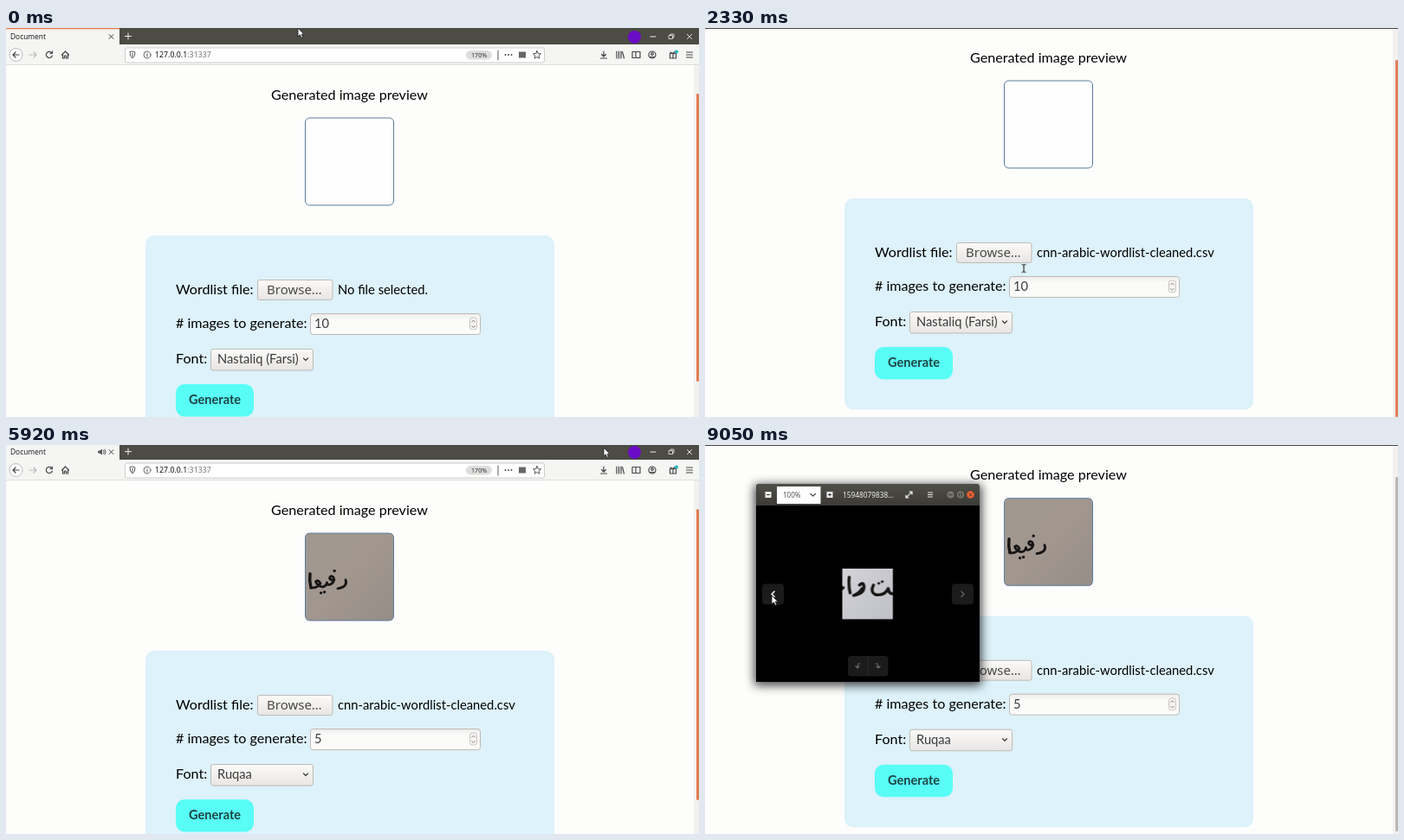
An HTML page for the animation above (9.18 s loop, 800x450 px).

```html
<!DOCTYPE html>
<html lang="en">
<head>
<meta charset="utf-8">
<title>Document</title>
<style>
html, body { margin: 0; width: 100%; height: 100%; overflow: hidden; background: #fdfdfc; }
svg { display: block; width: 100vw; height: 100vh; font-family: "Noto Sans", sans-serif; }
.lato { font: 16.12px Lato, sans-serif; fill: #000; }
.field { font: 14.7px Lato, sans-serif; fill: #3c3c3c; }
.ui { font-size: 8.35px; }
.line { fill: none; stroke: currentColor; stroke-linecap: round; stroke-linejoin: round; }
.ink { fill: none; stroke: #171414; stroke-linecap: round; stroke-linejoin: round; }

[class*="t-"] { animation: 9180ms infinite linear; }
[class*="s-"] { animation: 9180ms infinite step-end; }

.t-page { animation-name: page; animation-timing-function: ease-out; }
@keyframes page {
  0%, 7.5% { transform: none; }
  10.4%, 64% { transform: translateY(-43px); }
  64.6%, 76.2% { transform: none; }
  77.67% { transform: translateY(-41.5px); }
  79%, 100% { transform: translateY(-42.3px); }
}
.t-thumb { animation-name: thumb; animation-timing-function: ease-out; }
@keyframes thumb {
  0%, 7.5% { y: 76px; height: 333px; }
  10.4%, 64% { y: 37px; height: 413px; }
  64.6%, 76.2% { y: 76px; height: 333px; }
  77.67%, 100% { y: 37px; height: 410px; }
}
.s-thumb { animation-name: thumbColor; }
@keyframes thumbColor { 0% { fill: #e37d55; } 76.6% { fill: #b9b7b5; } }
.s-edge { animation-name: edge; }
@keyframes edge { 0% { fill: #0000; } 10% { fill: #45443f; } 64% { fill: #0000; } 77.5% { fill: #ccc; } 78.4% { fill: #45443f; } }

.t-shade { animation-name: shade; }
@keyframes shade { 0%, 16.3% { opacity: 0; } 18%, 22.8% { opacity: 1; } 24%, 100% { opacity: 0; } }
.t-dialog { animation-name: dialog; transform-origin: 415px 245px; animation-timing-function: ease-out; }
@keyframes dialog {
  0%, 16.3% { opacity: 0; transform: scale(.9); }
  18.2%, 22.7% { opacity: 1; transform: none; }
  23.9%, 100% { opacity: 0; transform: scale(.9); }
}
.t-viewer { animation-name: viewer; transform-origin: 188px 160px; animation-timing-function: ease-out; }
@keyframes viewer {
  0%, 76.4% { opacity: 0; transform: translateY(6px) scale(.9); }
  77.6% { opacity: 1; transform: translateY(2px) scale(.985); }
  78.6%, 100% { opacity: 1; transform: none; }
}
.s-focus { animation-name: focus; }
@keyframes focus { 0% { opacity: .5; } 78.8% { opacity: 1; } }
.s-close { animation-name: closeColor; }
@keyframes closeColor { 0% { fill: #77756e; } 78.8% { fill: #ec6237; } }
.t-controls { animation-name: controls; }
@keyframes controls { 0%, 83.5% { opacity: 0; } 86%, 100% { opacity: 1; } }

.s-empty { animation-name: empty; }
@keyframes empty { 0% { visibility: visible; } 23.4% { visibility: hidden; } }
.s-chosen { animation-name: chosen; }
@keyframes chosen { 0% { visibility: hidden; } 23.4% { visibility: visible; } }
.s-ten { animation-name: ten; }
@keyframes ten { 0% { visibility: visible; } 33.8% { visibility: hidden; } }
.s-five { animation-name: five; }
@keyframes five { 0% { visibility: hidden; } 33.8% { visibility: visible; } }
.s-font1 { animation-name: font1; }
@keyframes font1 { 0% { visibility: visible; } 46.8% { visibility: hidden; } }
.s-font2 { animation-name: font2; }
@keyframes font2 { 0% { visibility: hidden; } 46.8% { visibility: visible; } }
.s-result { animation-name: result; }
@keyframes result { 0% { visibility: hidden; } 54% { visibility: visible; } }
.s-download { animation-name: download; }
@keyframes download { 0% { opacity: 0; } 67.6% { opacity: 1; } 75.5% { opacity: 0; } }
.s-last { animation-name: last; }
@keyframes last { 0% { opacity: 1; } 92.6% { opacity: 0; } }
.s-previous { animation-name: previous; }
@keyframes previous { 0% { opacity: 0; } 92.6% { opacity: 1; } }

.t-pointer { animation-name: pointer; animation-timing-function: ease-in-out; }
@keyframes pointer {
  0%, 7.08% { transform: translate(337px, 0); }
  13.6%, 23.9% { transform: translate(339px, 255px); }
  25.3% { transform: translate(368px, 278px); }
  28%, 34.9% { transform: translate(378px, 300px); }
  40.3%, 42% { transform: translate(322px, 341px); }
  46.8%, 48% { transform: translate(290px, 357px); }
  53.4%, 57% { transform: translate(251px, 388px); }
  63.8% { transform: translate(690px, 0); }
  67%, 68.5% { transform: translate(690px, 31px); }
  72%, 75.2% { transform: translate(559px, 127px); }
  77%, 80.6% { transform: translate(538px, 127px); }
  86.1%, 100% { transform: translate(77px, 174px); }
}
.s-arrow { animation-name: arrow; }
@keyframes arrow { 0% { opacity: 1; } 24.4% { opacity: 0; } 36.5% { opacity: 1; } 51% { opacity: 0; } 58% { opacity: 1; } }
.s-beam { animation-name: beam; }
@keyframes beam { 0% { opacity: 0; } 24.4% { opacity: 1; } 36.5% { opacity: 0; } }
.s-hand { animation-name: hand; }
@keyframes hand { 0% { opacity: 0; } 51% { opacity: 1; } 58% { opacity: 0; } }
</style>
</head>
<body>
<svg viewBox="0 0 800 450" preserveAspectRatio="none">
  <defs>
    <linearGradient id="button" x2="0" y2="1"><stop stop-color="#fbfaf9"/><stop offset="1" stop-color="#e8e6e4"/></linearGradient>
    <linearGradient id="input" x2="0" y2="1"><stop stop-color="#ececeb"/><stop offset=".3" stop-color="#fbfbfa"/></linearGradient>
    <linearGradient id="bar" x2="0" y2="1"><stop stop-color="#504f48"/><stop offset="1" stop-color="#3b3a36"/></linearGradient>
    <linearGradient id="paper" x2="1" y2="1"><stop stop-color="#a0978e"/><stop offset=".5" stop-color="#a1978f"/><stop offset="1" stop-color="#968d86"/></linearGradient>
    <linearGradient id="pale" x2="1" y2="1"><stop stop-color="#d3d3d8"/><stop offset="1" stop-color="#bfc0c8"/></linearGradient>
    <filter id="shadow" x="-20%" y="-20%" width="140%" height="140%"><feGaussianBlur stdDeviation="6"/></filter>
    <g id="word">
      <rect width="101" height="101" rx="4" fill="url(#paper)"/>
      <g class="ink" stroke-width="2.8">
        <path stroke-width="3.4" d="M5 47Q4 55 6 63"/>
        <path d="M6 63Q13 64 17 58Q14 53 11.500 56Q14 62 20 62Q24 61 24.500 57Q25 61 29 59Q34 56 32 51Q28.500 48 27.500 52Q29 55 33 54"/>
        <path d="M46 54Q49 62 37 64"/>
        <path stroke-width="3.200" d="M33 43.500h.3M17.500 69h.2M21.500 68h.2"/>
      </g>
    </g>
    <path id="folder" d="M-4-3h3l1 1h4v1h-7l-1 3zM-2.6 0h7.2l-1 3.5h-7.2z" fill="#eee"/>
  </defs>

  <rect width="800" height="450" fill="#fdfdfc"/>
  <rect x="794" width="6" height="450" fill="#f2f1f0"/>

  <g class="t-page">
    <g class="lato">
      <text x="306" y="82.5">Generated image preview</text>
      <rect x="161" y="240" width="472" height="244.500" rx="10" fill="#ddf2fa"/>
      <text x="196" y="308">Wordlist file:</text>
      <text x="196" y="347"># images to generate:</text>
      <text x="196" y="388">Font:</text>
    </g>
    <rect x="346" y="104" width="101" height="101" rx="5" fill="#fefefe"/>
    <use class="s-result" href="#word" x="346" y="104"/>
    <rect x="345.500" y="104" width="102" height="101" rx="5" fill="none" stroke="#5b7b9d"/>

    <g stroke="#bfb9b3">
      <rect x="290.500" y="291.500" width="86.500" height="23" rx="2.500" fill="url(#button)"/>
      <rect x="351.500" y="330.500" width="196" height="24" rx="3" fill="url(#input)"/>
      <rect x="236.500" y="371.500" width="118" height="24.500" rx="2.500" fill="url(#button)"/>
      <rect x="535.500" y="335" width="8" height="14" rx="3" fill="#f6f5f4" stroke-width=".8"/>
    </g>
    <path class="line" color="#888" d="M537.700 340l1.800-2 1.800 2M537.700 344.500l1.800 2 1.800-2"/>
    <path class="line" color="#444" stroke-width="1.300" d="M343.500 382l2.500 2.500 2.500-2.500"/>
    <text x="301" y="308" font-size="15" fill="#4a4a48">Browse…</text>
    <g font-family="Lato, sans-serif" font-size="14.76" fill="#000">
      <text class="s-empty" x="383" y="308">No file selected.</text>
      <text class="s-chosen" x="383" y="308">cnn-arabic-wordlist-cleaned.csv</text>
    </g>
    <g class="field">
      <text class="s-ten" x="356" y="347">10</text>
      <text class="s-five" x="356" y="347">5</text>
      <text class="s-font1" x="244" y="388">Nastaliq (Farsi)</text>
      <text class="s-font2" x="244" y="388">Ruqaa</text>
    </g>
    <rect x="196" y="412" width="90" height="37.500" rx="10" fill="#58fdf6"/>
    <text x="211" y="435" font-family="Lato, sans-serif" font-weight="700" font-size="14.6" fill="#1d4543">Generate</text>

    <g id="toolbar" class="ui">
      <rect width="800" height="19.500" fill="#4c4b44"/>
      <rect width="131" height="20" fill="#f5f5f4"/>
      <rect width="131" height="1.300" fill="#e37d55"/>
      <rect y="19" width="800" height="24" fill="#f5f5f4"/>
      <rect y="42.400" width="800" height=".6" fill="#ccc"/>
      <text x="5" y="13" fill="#222">Document</text>
      <g class="s-result line" color="#555" stroke-width="1">
        <path fill="#555" d="M107 9h1.500l2-2v6l-2-2H107z"/><path d="M112.500 8q1.500 2 0 4M114 7q2.300 3 0 6"/>
      </g>
      <path class="line" color="#444" d="M119 7.500l5 5m0-5l-5 5"/>
      <g class="line" color="#eee">
        <path d="M137.500 9.500h7M141 6v7M744 10h6M786.500 7.500l5 5m0-5l-5 5"/>
        <path stroke-width=".8" d="M765.500 8.500h4v4h-4zM767 8.500V7h4v4h-1.500"/>
      </g>
      <circle cx="725.500" cy="10.500" r="7.500" fill="#6a0cc5"/>
      <rect x="137.500" y="23" width="484" height="17" rx="2" fill="#fff" stroke="#cfcdcb"/>
      <rect x="531" y="26" width="30" height="10.500" rx="5.200" fill="#dedddc"/>
      <text x="537" y="34" font-size="7.2" fill="#333">170%</text>
      <text x="172" y="34.300" font-size="8.800" fill="#111">127.0.0.1<tspan fill="#777">:31337</tspan></text>
      <rect class="s-download" x="682" y="23" width="16" height="16" rx="2" fill="#ccc"/>
      <circle cx="11.500" cy="31" r="7.500" fill="#fdfdfd" stroke="#aaa" stroke-width=".8"/>
      <g class="line" color="#454545" stroke-width="1.200">
        <path d="M15 31H8m3-3l-3 3 3 3"/>
        <path stroke="#bbb" d="M27 31h8m-3-3l3 3-3 3"/>
        <path d="M53 29a3.600 3.600 0 1 0 .4 3M53.500 27v2.500H51M64.500 31l4-4 4 4M65.500 31v4h2v-3h2v3h2v-4"/>
        <path stroke-width=".9" d="M146 27l3 1q0 5-3 7-3-2-3-7zM146 29v4M163 30.500v2.500M163 29v.1M568 26v11"/>
        <circle cx="163" cy="31" r="4" stroke-width=".8"/>
        <path stroke-width="1.800" d="M576.500 31h.1M580 31h.1M583.500 31h.1"/>
        <path stroke-width=".9" d="M613 26.500l1.300 3 3.200.3-2.400 2.200.7 3.200-2.800-1.700-2.800 1.700.7-3.200-2.400-2.200 3.200-.3z"/>
        <path d="M690 27v6m-2.500-2.500L690 33l2.500-2.500M686.500 35h7M705 27v8M707.500 27v8M710 27v8M711.500 27.500l2 7.500"/>
        <path d="M723 27.500h9v7h-9zM727 27.500v7M785.500 28h7M785.500 31h7M785.500 34h7"/>
        <circle cx="746" cy="31" r="4"/><circle cx="746" cy="30" r="1.300"/><path d="M743.500 33.500h5"/>
        <path d="M766.500 29.500h7v5.500h-7zM770 29.500V35M767 28l3 1.500 2-2"/>
      </g>
      <rect x="592" y="27.500" width="8" height="7" fill="#666"/>
      <circle cx="774" cy="27.500" r="2" fill="#19b7b4"/>
    </g>
  </g>

  <g class="s-thumb"><rect class="t-thumb" x="797" y="76" width="3" height="333" rx="1"/></g>
  <rect class="s-edge" width="800" height="1"/>

  <rect class="t-shade" y="1" width="800" height="449" fill="#000" fill-opacity=".32"/>
  <g class="t-dialog ui">
    <rect x="28" y="15" width="790" height="460" opacity=".55" filter="url(#shadow)"/>
    <rect x="30" y="15" width="770" height="440" rx="4" fill="#f0efee"/>
    <path d="M30 41V19q0-4 4-4H800v26z" fill="url(#bar)"/>
    <rect x="34" y="19" width="36" height="18" rx="2" fill="none" stroke="#333"/>
    <rect x="735" y="19" width="19" height="18" rx="2" fill="none" stroke="#333"/>
    <rect x="760" y="18.500" width="35" height="19" rx="2" fill="#2c9450" stroke="#1d6b3a"/>
    <g fill="#e9e7e2">
      <text x="40" y="31">Cancel</text><text x="767" y="31">Open</text>
      <text x="391" y="31" font-weight="700">File Upload</text>
    </g>
    <g class="line" color="#eee" stroke-width="1.300"><circle cx="743.500" cy="27" r="2.500"/><path d="M745.500 29l2.500 2.500"/></g>
    <rect x="30" y="40" width="137" height="383" fill="#5c5a4c"/>
    <rect x="30" y="40" width="23" height="383" fill="#49483f"/>
    <g id="places" fill="#eeede8"></g>
    <g class="line" color="#eee" stroke-width="1.100">
      <circle cx="41.500" cy="50.500" r="3.800"/><path d="M41.500 50.500V48M41.500 50.500l-1.500-1.500"/>
      <path d="M37.500 70l4-4 4 4M38.500 70v3.500h6V70M39 103h3.500l2 2v6H39zM41.500 122v7m-3-3l3 3 3-3"/>
      <path d="M40 147.500v-6h4v5"/><circle cx="39" cy="147.500" r="1"/><circle cx="43" cy="146.500" r="1"/>
      <path d="M38 161h2l1-1h2l1 1h2v5.500h-8z"/><circle cx="42" cy="163.500" r="1.400"/>
      <path fill="#eee" d="M40 180h4v4h-4zM38 180.500v3"/>
      <path d="M41.500 321v6M38.500 324h6"/>
    </g>
    <rect x="167" y="64" width="633" height="359" fill="#fefefe"/>
    <path d="M167 64h633M167 79.500h633M167 423h633M705.500 65v14M746.500 65v14" stroke="#dcdad8" stroke-width=".8"/>
    <g id="crumbs"></g>
    <path d="M180 49v5l-3-2.500z" fill="#333"/><path d="M543 49v5l3-2.500z" fill="#999"/>
    <path class="line" color="#333" stroke-width="1.200" d="M190 52l4-4 4 4M191 52v3h2v-2h2v2h2v-3"/>
    <rect x="167" y="80" width="633" height="14.500" fill="#e3693e"/>
    <g fill="#333">
      <text x="171" y="75">Name</text><text x="709" y="75">Size</text><text x="751" y="75">Modified</text>
      <path d="M789 70h6l-3 4z"/>
      <text x="186" y="104.500">cnn-arabic-wordlist.7z</text><text x="710" y="104.500">306.6 kB</text>
      <text x="789" y="104.500" direction="rtl" font-family="DejaVu Sans, sans-serif" font-size="8">23 حزيران</text>
    </g>
    <g fill="#fff">
      <text x="186" y="90.500">cnn-arabic-wordlist-cleaned.csv</text><text x="710" y="90.500">1.4 MB</text>
      <text x="789" y="90.500" direction="rtl" font-family="DejaVu Sans, sans-serif" font-size="8">30 حزيران</text>
    </g>
    <path d="M173 83h5l2 2v7h-7z" fill="#eee" stroke="#bbb" stroke-width=".5"/>
    <rect x="172" y="97" width="9" height="8" rx="1" fill="#c75b52"/><path d="M172 101h9v4h-9z" fill="#6e9a5c"/>
    <rect x="748" y="428.500" width="47.500" height="17" rx="2" fill="url(#button)" stroke="#c4c0bc"/>
    <text x="752" y="440" fill="#333">All Files</text><path d="M785 435h6l-3 4z" fill="#333"/>
  </g>

  <g class="t-viewer">
    <rect x="57" y="46" width="262" height="232" opacity=".75" filter="url(#shadow)"/>
    <path d="M59 274V49q0-4 4-4h250q4 0 4 4v225z"/>
    <path d="M59 70V49q0-4 4-4h250q4 0 4 4v21z" fill="url(#bar)"/>
    <rect x="83" y="48" width="50.500" height="20" fill="#fefefe"/>
    <text x="90" y="60.500" font-size="8" fill="#555">100%</text>
    <path class="line" color="#444" stroke-width="1.200" d="M122 56.500l2.700 2.700 2.700-2.700"/>
    <g class="s-focus">
      <path fill="#eee" d="M69.500 54h7v7h-7zM140.500 54h7v7h-7z"/>
      <path class="line" color="#333" d="M71.500 57.500h3M142.500 57.500h3M144 56v3"/>
      <g font-size="8.300" fill="#eee">
        <text class="s-last" x="159" y="60.500">15948079839…</text>
        <text class="s-previous" x="159" y="60.500">15948079838…</text>
      </g>
      <path class="line" color="#eee" stroke-width="1.200" d="M236 54h3v3M239 54l-3 3M232 58v3h3M232 61l3-3M257.500 55h5M257.500 57.500h5M257.500 60h5"/>
    </g>
    <g fill="#77756e" stroke="#33322e" stroke-width=".7">
      <circle cx="283.500" cy="57.500" r="4.700"/><circle cx="295" cy="57.500" r="4.700"/>
      <circle class="s-close" cx="306.500" cy="57.500" r="4.700"/>
    </g>
    <path class="line" color="#33322e" stroke-width=".8" d="M281.500 57.500h4M293.500 56h3v3h-3zM305 56l3 3m0-3l-3 3"/>
    <use class="s-last" href="#word" transform="translate(158.500 143) scale(.58)"/>
    <g class="s-previous">
      <svg x="158.500" y="143" width="58.500" height="58.500" viewBox="0 0 58.500 58.500">
        <rect width="58.500" height="58.500" fill="url(#pale)"/>
        <g class="ink" stroke-width="3.400">
          <path d="M0 23l1-1M8 10Q7 20 9 28M20 19Q24 15 25 20Q26 29 13 31Q19 29 23 23"/>
          <path d="M36 19Q32 27 38 30Q49 32 53 23Q54 30 59 29"/>
          <path stroke-width="3" d="M42 17h.2M46 15h.2"/>
        </g>
      </svg>
    </g>
    <g class="t-controls">
      <g fill="#1b1b1b">
        <rect x="66" y="160.500" width="25" height="24" rx="4"/><rect x="285" y="160.500" width="25" height="24" rx="4"/>
        <rect x="165" y="244" width="46.500" height="23.500" rx="4"/>
      </g>
      <path class="line" color="#eee" stroke-width="1.700" d="M80 169.500l-3 3 3 3"/>
      <path class="line" color="#666" stroke-width="1.200" d="M296 169.500l3 3-3 3M179 253h-2q-1 0-1 5m-2-2l2 2 2-2M197 253h2q1 0 1 5m-2-2l2 2 2-2"/>
      <path d="M188 245v22" stroke="#333" stroke-width=".7"/>
    </g>
  </g>

  <g class="t-pointer">
    <path class="s-arrow" d="M0 0V10L2.400 7.900 4 11.400 5.700 10.700 4.200 7.200H7Z" fill="#fff" stroke="#222" stroke-width=".9"/>
    <path class="s-beam line" color="#333" stroke-width="1.200" d="M-2-4.500q2 0 2 1.500v6q0 1.500-2 1.500M2-4.500Q0-4.500 0-3v6q0 1.500 2 1.500"/>
    <path class="s-hand" d="M-1 0q1-1.200 2 0v3.500l5 1v3L5 10H0L-3.500 6q0-1.500 2.500 0z" fill="#fff" stroke="#222" stroke-width=".9"/>
  </g>
</svg>
<script>
const fill = (id, items, draw) => {
  document.getElementById(id).innerHTML = items.map(draw).join("");
};

const places = ["Recent", "Home", "Desktop", "Documents", "Downloads", "Music", "Pictures", "Videos",
  "handson-ml2", "font-classification", "writing-temp-resou…", "DAC", "scholarship", "/", "Other Locations"];
fill("places", places, (name, i) => {
  const y = 50.5 + i * 18.8 + (i > 7 ? 5.2 : 0) + (i > 13 ? 5.2 : 0);
  const icon = i === 2 || (i > 7 && i < 14) ? `<use href="#folder" x="41.5" y="${y}"/>` : "";
  return `${icon}<text x="60" y="${y + 3}">${name}</text>`;
});

// Each entry: left edge, width, label, label offset.
const crumbs = [[172, 14, "", 0], [186, 62, "nadhoul", 15], [248, 58, "Documents", 7], [306, 48, "projects", 8],
  [354, 84, "font-classification", 7], [438, 49, "data-gen", 7], [487, 50, "wordlists", 7], [537, 15, "", 0]];
fill("crumbs", crumbs, ([x, width, label, offset]) => `
  <rect x="${x}" y="44" width="${width}" height="15.5" stroke="#c6c2be" stroke-width=".8"
    fill="${label === "wordlists" ? "#d3d0cd" : "url(#button)"}"/>
  <text x="${x + offset}" y="55" fill="#333">${label}</text>`);
</script>
</body>
</html>
```
